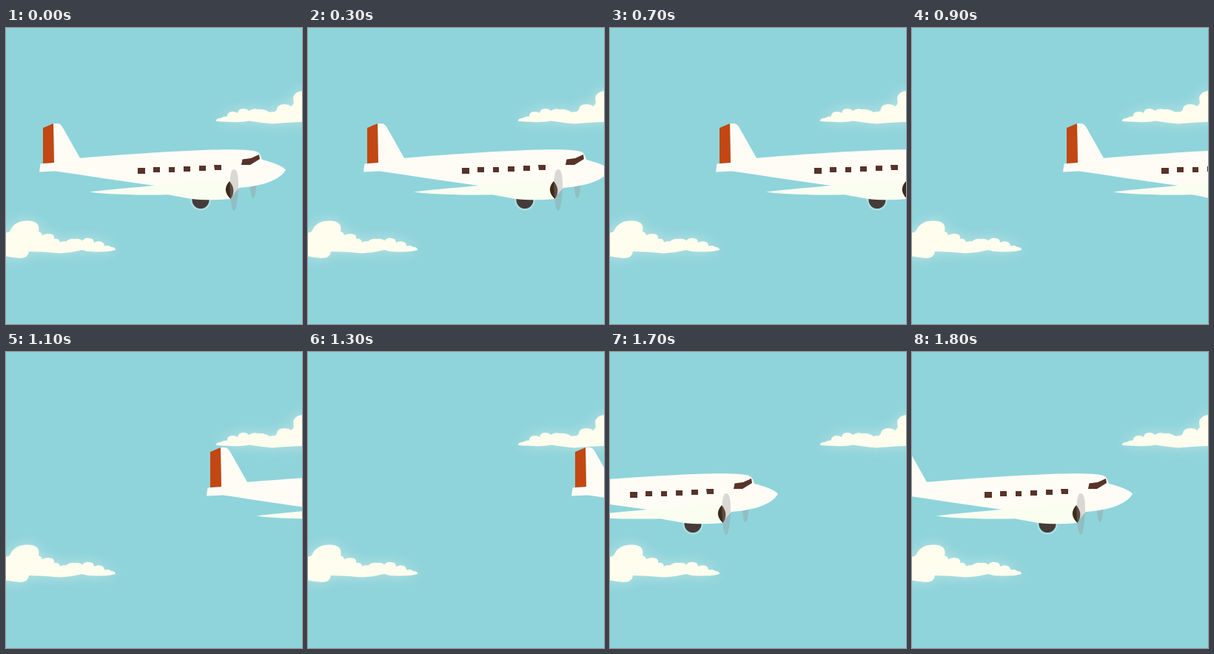
An HTML page for the animation above (1.9 s loop, 400 px wide and 400 px high).

```html
<!DOCTYPE html>
<html lang="en">
<head>
<meta charset="utf-8">
<title>Plane in the sky</title>
<style>
  html, body { margin: 0; width: 100%; height: 100%; overflow: hidden; background: #8fd4db; }
  svg { display: block; width: 100%; height: 100%; }
  .clouds { fill: #fffdee; filter: drop-shadow(0 0 9px rgba(255, 253, 238, .38)); }
  .blade { fill: #969696; fill-opacity: .35; }
</style>
</head>
<body>
<svg viewBox="0 0 400 400">
  <defs>
    <g id="plane">
      <path class="blade" d="M329.500 209 C330 222 332 230 334 230 C336 230 338 222 338.500 209Z"/>
      <circle cx="263" cy="232.500" r="14" fill="#fff" fill-opacity=".25"/>
      <circle cx="263" cy="232.500" r="11.500" fill="#453c39"/>
      <path fill="#fffcf6" d="M64 129 L70 129 Q74 129.500 77 135 L100 175.700 C165 170.500 230 166 280 164.500
        C315 163.500 337 165 341 168 Q343.500 170 346 178 C360 181.500 373 186 378 191.500
        C374 200 358 213 315 216 L302 231 L210 214 C160 208 120 201 67 193.500 L45 194.500 L46.500 183.500 L65 182Z"/>
      <path fill="#c24712" d="M50 135 L64 129 L65 182 L50 183Z"/>
      <path fill="#fafef0" d="M113 221.500 C140 218 175 215.500 205 212.500 C240 207 280 205 302 207 L303 231
        Q285 233 262 232 C245 231 230 227 219 225.300 C180 226 135 225 113 221.500Z"/>
      <path fill="#573329" d="M178 189h10v8h-10z M199 188h9v7h-9z M220 188h8v7h-8z M240 187h9v7h-9z
        M261 186h9v7h-9z M281 185h10v7h-9z M319.500 177.500 L331 176 L342 171 L343 177 L330 185 L318 185Z"/>
      <path fill="#3d2a1a" d="M302 207 Q312 219 303.500 231 Q291 219 302 207Z"/>
      <path class="blade" d="M308 191 C312.500 191 314 200 314 212 C314 230 311 247 308 247 C305 247 302.500 230 302.500 212 C302.500 200 304 191 308 191Z"/>
    </g>
  </defs>
  <g class="clouds">
    <path d="M284 126 Q283 122 291 121.500 Q294 119 299 119.500 Q299 113 306 113 Q311 113 313 115 Q314 109 320 109
      Q326 109 328 112 Q334 108 340 110 Q346 109 353 112 Q356 115 360 113 Q364 114 366 110 Q366 104 375 103
      Q383 103 385 106 Q388 104 389 101 Q385 87 400 85 L440 85 L440 127 L400 127 Q385 127 360 129.500
      Q344 128 328 125.500 Q318 128.500 284 126Z"/>
    <path d="M-40 276 L0 276.500 Q4 277 6 273 Q12 260 30 260.500 Q47 261 44 275 Q48 276 49 280 Q55 277 61 278.500
      Q66 280 65 285 Q72 284 73 289.500 Q78 287 81 288.500 Q86 284 93 285 Q100 284 103 287.500 Q107 283 112 284
      Q119 284 119 290 Q124 287 129 289 Q133 290 133 294.500 Q140 293 142 296 Q148 296 148 300
      Q142 302.500 120 302.500 Q110 302.500 103 300 Q88 304 73 304.500 Q52 302 31 302 Q30 311 19 311 Q8 310 0 308.500 L-40 308Z"/>
  </g>
  <use id="leaving" href="#plane"/>
  <use id="arriving" href="#plane"/>
</svg>
<script>
const STEP = 100, STEPS = 19, SPAN = 700;
// [step, position, speed]: steady acceleration, wrapping after SPAN
const path = [
  [0, 0, 9], [3, 30, 12], [6, 74, 20], [9, 159, 32],
  [11, 226, 36], [15, 420, 60], [18, 620, 74], [19, SPAN, 82]
];
const leaving = document.getElementById('leaving');
const arriving = document.getElementById('arriving');

function positionAt(step) {
  const i = path.findIndex(key => key[0] > step);
  const [t0, x0, v0] = path[i - 1], [t1, x1, v1] = path[i];
  const d = t1 - t0, u = (step - t0) / d, w = 1 - u;
  return w * w * (1 + 2 * u) * x0 + u * u * (3 - 2 * u) * x1 + d * u * w * (w * v0 - u * v1);
}

function draw() {
  const step = Math.floor(performance.now() / STEP) % STEPS;
  const x = Math.round(positionAt(step));
  leaving.setAttribute('x', x);
  arriving.setAttribute('x', x - SPAN);
  requestAnimationFrame(draw);
}
draw();
</script>
</body>
</html>
```
